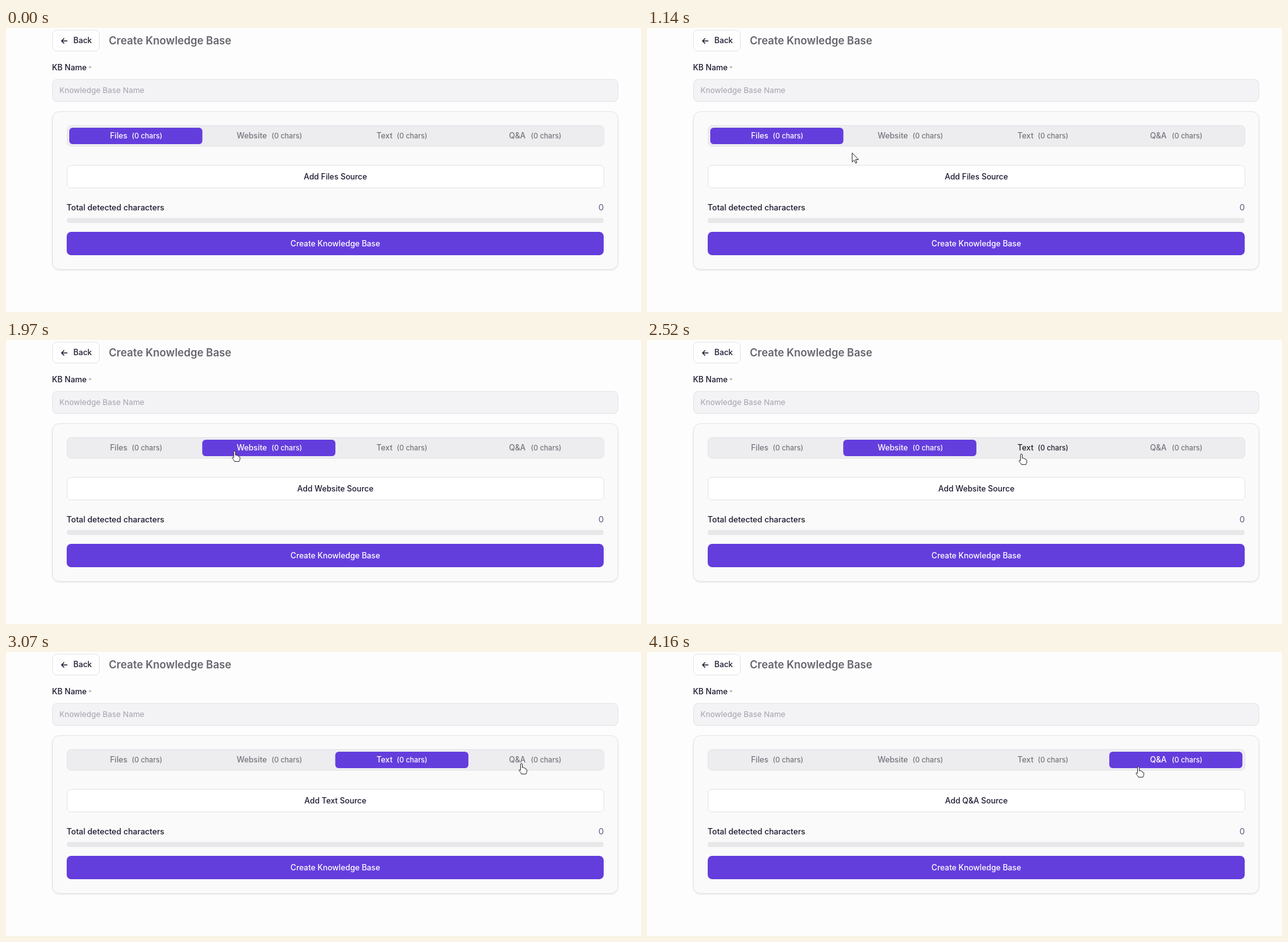
An HTML page that plays this animation: 1004x450 px, repeating every 4230 ms.

```html
<!DOCTYPE html>
<html lang="en">
<head>
<meta charset="utf-8">
<title>Create Knowledge Base</title>
<style>
  html, body { margin: 0; width: 100%; height: 100%; overflow: hidden; background: #fdfdfd; }
  svg { display: block; width: 100vw; height: 100vh; }
  text { font: 500 12.4px Inter, "Open Sans", sans-serif; fill: #1c1930; }
  .mid { text-anchor: middle; }
  .title { font-size: 16.8px; font-weight: 600; fill: #65656e; }
  .hint { font-size: 12.25px; font-weight: 400; fill: #a3a3ae; }
  .chars { font-size: 11.2px; }
  .box { stroke: #e4e4e8; }
  .accent { fill: #643ddd; }
</style>
</head>
<body>
<svg viewBox="0 0 1004 450" xmlns="http://www.w3.org/2000/svg">
  <defs>
    <filter id="shadow" x="-5%" y="-5%" width="110%" height="112%">
      <feDropShadow dx="0" dy="1" stdDeviation="1" flood-color="#000" flood-opacity=".1"/>
    </filter>
  </defs>
  <rect width="1004" height="450" fill="#fdfdfd"/>

  <rect class="box" x="73.5" y="3.5" width="74" height="33" rx="7" fill="#fff"/>
  <path d="M97 20.5H88M92 16.3l-4.2 4.2 4.2 4.2" fill="none" stroke="#1c1930" stroke-width="1.3"/>
  <text x="106.5" y="24.4">Back</text>
  <text class="title" x="162.5" y="26.3">Create Knowledge Base</text>

  <text x="72.8" y="67.3">KB Name</text>
  <text x="130.5" y="67" style="font-size:9.5px;fill:#a89a80">*</text>
  <rect class="box" x="73.5" y="81.5" width="894" height="35" rx="7" fill="#f3f3f5"/>
  <text class="hint" x="84.5" y="103.4">Knowledge Base Name</text>

  <rect class="box" x="73.5" y="132.5" width="894" height="250" rx="11" fill="#fafafa" filter="url(#shadow)"/>
  <rect class="box" x="96.5" y="154.5" width="849" height="33" rx="7" fill="#ededf0"/>
  <rect id="active" class="accent" y="158" width="210.5" height="26" rx="5.5"/>
  <g id="tabs"></g>

  <rect class="box" x="96.5" y="217.5" width="849" height="36" rx="7" fill="#fff"/>
  <text id="source" class="mid" x="520.8" y="239.9"></text>

  <text x="95.8" y="288.9" style="font-size:12.65px">Total detected characters</text>
  <text x="945.3" y="289" text-anchor="end" style="font-size:13.5px;font-weight:400;fill:#62587f">0</text>
  <rect x="96" y="301" width="849" height="8" rx="4" fill="#e8e8ea"/>
  <rect class="accent" x="96" y="323" width="849" height="37" rx="7"/>
  <text class="mid" x="520.7" y="346.2" style="fill:#fff">Create Knowledge Base</text>

  <g id="cursor" stroke="#222" stroke-width=".95" stroke-linejoin="round" fill="#fff">
    <circle id="press" cy="-.5" r="11" fill="#f5ec55" fill-opacity=".82" stroke="none"/>
    <path id="hand" d="M-1.4 9.5V1.2a1.4 1.4 0 0 1 2.8 0V6.4l1-.6 1.3.5.4.7 1.3-.2 1 1 .1.7 1.2 0 .8 1v3.2c0 1.5-1 2-1.3 3.6H0c-.6-1.8-2.6-3.5-3.6-5.6-.6-1.3 1-1.9 2.2-.2z"/>
    <path id="arrow" d="M0 0V14.5l3.3-3.1 2.2 5 2.1-.9-2.2-4.9h4.6z"/>
  </g>
</svg>
<script>
  const LOOP = 4230, START = 330, STEP = 68.4, HOVER_LAG = 130;
  const TAB_X = 100, TAB_W = 210.3;

  // name, label centre, count centre
  const TABS = [
    ['Files', 178.3, 223],
    ['Website', 388.6, 444],
    ['Text', 598.4, 642],
    ['Q&A', 808.4, 854]
  ];
  // time, x, y of the pointer tip
  const PATH = [
    [330, 226, 424], [670, 277, 233], [810, 285, 229], [1420, 352, 176],
    [1900, 352, 176], [2500, 592, 181], [2790, 592, 181], [3060, 815, 177],
    [3290, 825, 175], [3880, 825, 175], [4150, 777, 182]
  ];
  // press time, tab index
  const CLICKS = [[1620, 1], [2645, 2], [3740, 3]];

  const el = id => document.getElementById(id);
  const show = (node, on) => node.setAttribute('visibility', on ? 'visible' : 'hidden');

  function addText(x, content, cls) {
    const node = document.createElementNS('http://www.w3.org/2000/svg', 'text');
    node.setAttribute('x', x);
    node.setAttribute('y', 175.3);
    node.setAttribute('class', cls);
    node.textContent = content;
    el('tabs').append(node);
    return node;
  }

  const labels = TABS.map(([name, x, countX]) =>
    [addText(x, name, 'mid'), addText(countX, '(0 chars)', 'mid chars')]);

  function pointerAt(t) {
    const i = PATH.findIndex(p => p[0] > t);
    if (i === 0) return PATH[0].slice(1);
    if (i < 0) return PATH[PATH.length - 1].slice(1);
    const [t0, x0, y0] = PATH[i - 1], [t1, x1, y1] = PATH[i];
    const u = (t - t0) / (t1 - t0), k = u * u * (3 - 2 * u);
    return [x0 + (x1 - x0) * k, y0 + (y1 - y0) * k];
  }

  const tabUnder = ([x, y]) => y > 158 && y < 184 ? Math.floor((x - TAB_X) / TAB_W) : -1;

  const clickable = ([x, y]) => x > 96 && x < 945 &&
    [[158, 184], [217, 254], [323, 360]].some(([top, bottom]) => y >= top && y <= bottom);

  const tabAt = t => CLICKS.reduce((tab, [at, i]) => t >= at ? i : tab, 0);

  function draw(time) {
    const t = time < START ? 0 : START + Math.floor((time - START + 10) / STEP) * STEP;
    const pos = pointerAt(t), present = t >= START;
    const active = tabAt(t - 60);
    const hover = present ? tabUnder(pointerAt(t - HOVER_LAG)) : -1;

    el('active').setAttribute('x', TAB_X + active * TAB_W);
    el('source').textContent = `Add ${TABS[tabAt(t)][0]} Source`;
    labels.forEach((pair, i) => {
      const color = i === active ? '#fff' : i === hover ? '#22202b' : '#75757d';
      pair.forEach(node => node.style.fill = color);
    });

    const hand = clickable(pos);
    el('cursor').setAttribute('transform', `translate(${pos[0]} ${pos[1]})`);
    show(el('hand'), present && hand);
    show(el('arrow'), present && !hand);
    show(el('press'), CLICKS.some(([at]) => t >= at && t < at + 135));
  }

  const begin = performance.now();
  function tick() {
    draw((performance.now() - begin) % LOOP);
    requestAnimationFrame(tick);
  }
  tick();
</script>
</body>
</html>
```
